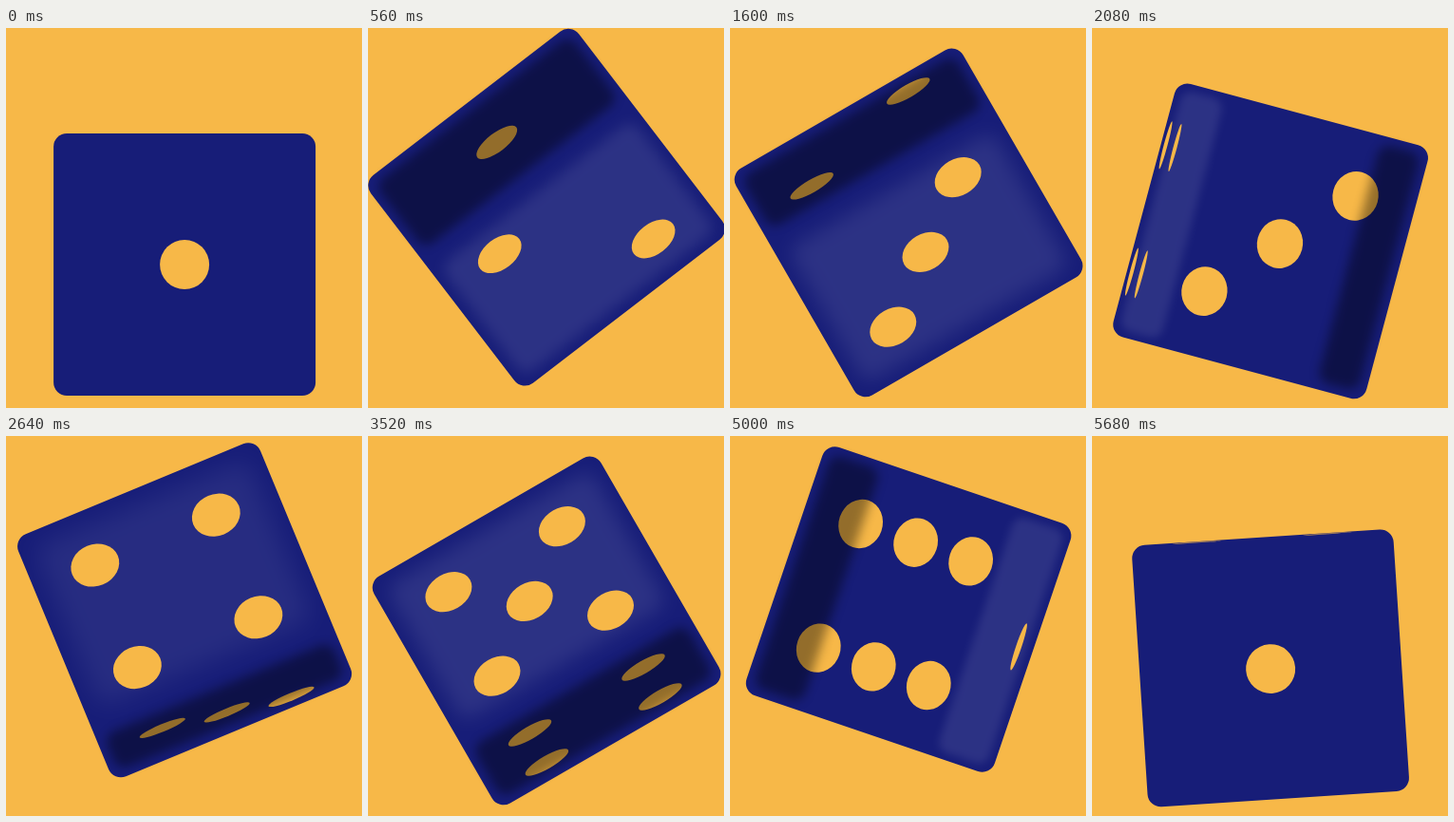
These frames come from a looping animation (375x400 px, 5720 ms). An HTML page:

```html
<!DOCTYPE html>
<html lang="en">
<head>
<meta charset="utf-8">
<title>Rolling die</title>
<style>
  html, body { margin: 0; width: 100%; height: 100%; overflow: hidden; background: #f7b848; }
  svg { display: block; width: 100vw; height: 100vh; }
</style>
</head>
<body>
<svg viewBox="0 0 375 400">
  <defs>
    <filter id="softLight" filterUnits="userSpaceOnUse" x="-180" y="-180" width="360" height="360">
      <feGaussianBlur id="lightBlur" stdDeviation="4"/>
    </filter>
    <filter id="softDark" filterUnits="userSpaceOnUse" x="-180" y="-180" width="360" height="360">
      <feGaussianBlur stdDeviation="5.5"/>
    </filter>
  </defs>
  <rect width="375" height="400" fill="#f7b848"/>
  <g id="die">
    <rect x="-138" y="-138" width="276" height="276" rx="14" fill="#171d78"/>
    <g class="axis"><rect id="light" rx="12" fill="#fff" filter="url(#softLight)"/></g>
    <g id="faces" fill="#f7b848"></g>
    <g class="axis"><rect id="dark" rx="12" fill="#000" filter="url(#softDark)"/></g>
  </g>
</svg>
<script>
const STEP = 40, LOOP = 5720, STEPS_PER_FACE = 24, STEPS_PER_BOUNCE = 48;
const HALF = 138, GAP = 69, PIP = 26;
const CENTER_X = 188.1, FLOOR_Y = 249, JUMP = 68.3;

const $ = id => document.getElementById(id);
const setAttrs = (el, attrs) => {
  for (const key in attrs) el.setAttribute(key, attrs[key]);
};
const clamp01 = v => Math.max(0, Math.min(1, v));
const smooth = v => v * v * (3 - 2 * v);

function bezierEase(x1, y1, x2, y2) {
  const curve = (a, b, t) => 3 * a * t * (1 - t) ** 2 + 3 * b * t * t * (1 - t) + t ** 3;
  return x => {
    let low = 0, high = 1;
    for (let i = 0; i < 30; i++) {
      const mid = (low + high) / 2;
      if (curve(x1, x2, mid) < x) low = mid; else high = mid;
    }
    return curve(y1, y2, low);
  };
}
const rise = bezierEase(0.1, 0.08, 0.25, 1);

// Pip positions in units of GAP
const diagonal = [[-1, 1], [1, -1]];
const corners = [...diagonal, [-1, -1], [1, 1]];
const center = [0, 0];
const layouts = [
  [center],
  diagonal,
  [...diagonal, center],
  corners,
  [...corners, center],
  [...corners, [-1, 0], [1, 0]]
];

const faces = layouts.map(pips => {
  const face = document.createElementNS("http://www.w3.org/2000/svg", "g");
  for (const [x, y] of pips) {
    const pip = document.createElementNS("http://www.w3.org/2000/svg", "circle");
    setAttrs(pip, { cx: x * GAP, cy: y * GAP, r: PIP });
    face.append(pip);
  }
  $("faces").append(face);
  return face;
});
const axes = document.querySelectorAll(".axis");

// Squeezes a face along the rolling axis
function placeFace(face, upward, offset, scale) {
  const transform = upward
    ? `translate(0 ${-offset}) scale(1 ${scale})`
    : `translate(${offset} 0) scale(${scale} 1)`;
  setAttrs(face, { transform, display: scale > 0 ? "inline" : "none" });
}

// side is 1 for the entering edge, -1 for the leaving one
function placeShade(rect, side, reach, inset, opacity) {
  const width = Math.max(0, reach - inset);
  setAttrs(rect, {
    x: side > 0 ? HALF - reach : inset - HALF,
    y: inset - HALF,
    width,
    height: 2 * (HALF - inset),
    opacity: width > 0 ? opacity : 0
  });
}

function render(time) {
  let step = Math.floor((time % LOOP) / STEP);
  if (step === 142) step = 143; // the last step before the loop advances twice

  const bounce = (step % STEPS_PER_BOUNCE) / (STEPS_PER_BOUNCE / 2);
  const y = FLOOR_Y - JUMP * rise(1 - Math.abs(1 - bounce));
  $("die").setAttribute("transform",
    `translate(${CENTER_X} ${y}) rotate(${step * 90 / STEPS_PER_FACE})`);

  const index = Math.floor(step / STEPS_PER_FACE);
  const p = (step % STEPS_PER_FACE) / STEPS_PER_FACE;
  const turn = smooth(p);
  const upward = index % 2 === 1;

  faces.forEach(face => face.setAttribute("display", "none"));
  placeFace(faces[index], upward, -HALF * turn, 1 - turn);
  placeFace(faces[(index + 1) % 6], upward, HALF * (1 - turn), turn);

  axes.forEach(axis => axis.setAttribute("transform", `rotate(${upward ? -90 : 0})`));
  const grown = 11 + 250 * p;
  const fadeIn = clamp01(p / 0.12);
  const blur = 4 + 36 * Math.max(0, p - 0.5);
  $("lightBlur").setAttribute("stdDeviation", blur);
  placeShade($("light"), 1, grown, 3.5 + blur, 0.09 * fadeIn * clamp01((0.95 - p) / 0.27));
  placeShade($("dark"), -1, Math.min(grown, 275 * (1 - p) - 20), 8.5, 0.4 * fadeIn);
}

function tick() {
  render(performance.now());
  requestAnimationFrame(tick);
}
tick();
</script>
</body>
</html>
```
